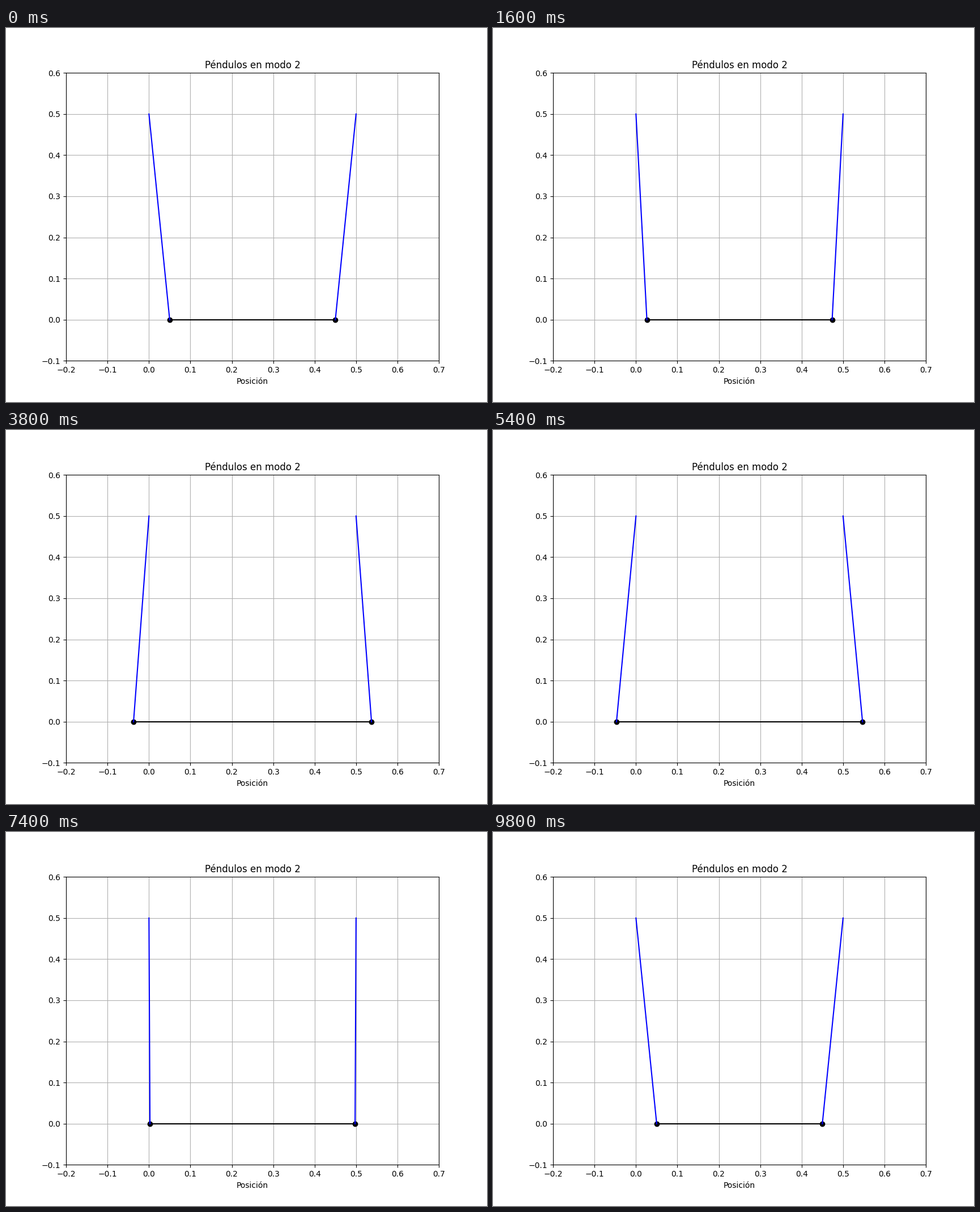
Write a matplotlib script that moves like this. It is 849 by 660 pixels and loops after 9900 ms.

```python
import numpy as np
import matplotlib.pyplot as plt
from matplotlib.animation import FuncAnimation

FRAMES = 99
INTERVAL = 100      # ms
LENGTH = 0.5        # height of the pivots above the masses
GAP = 0.5           # distance between the pivots
AMPLITUDE = 0.05

plt.rcParams["font.family"] = "DejaVu Sans"

fig, ax = plt.subplots(figsize=(8.49, 6.6), dpi=100)
ax.set_xlim(-0.2, 0.7)
ax.set_ylim(-0.1, 0.6)
ax.set_title("Péndulos en modo 2")
ax.set_xlabel("Posición")
ax.grid(True)

spring, = ax.plot([], [], "ko-")
left, = ax.plot([], [], "b-")
right, = ax.plot([], [], "b-")


def swing(frame):
    """Offset of the masses; the far turning point is shown only once."""
    step = frame if frame < FRAMES // 2 + 1 else frame + 1
    return AMPLITUDE * np.cos(2 * np.pi * step / FRAMES)


def update(frame):
    dx = swing(frame)
    x1, x2 = dx, GAP - dx
    spring.set_data([x1, x2], [0, 0])
    left.set_data([0, x1], [LENGTH, 0])
    right.set_data([GAP, x2], [LENGTH, 0])
    return spring, left, right


anim = FuncAnimation(fig, update, frames=FRAMES, interval=INTERVAL,
                     repeat=True, repeat_delay=0)
plt.show()
```
